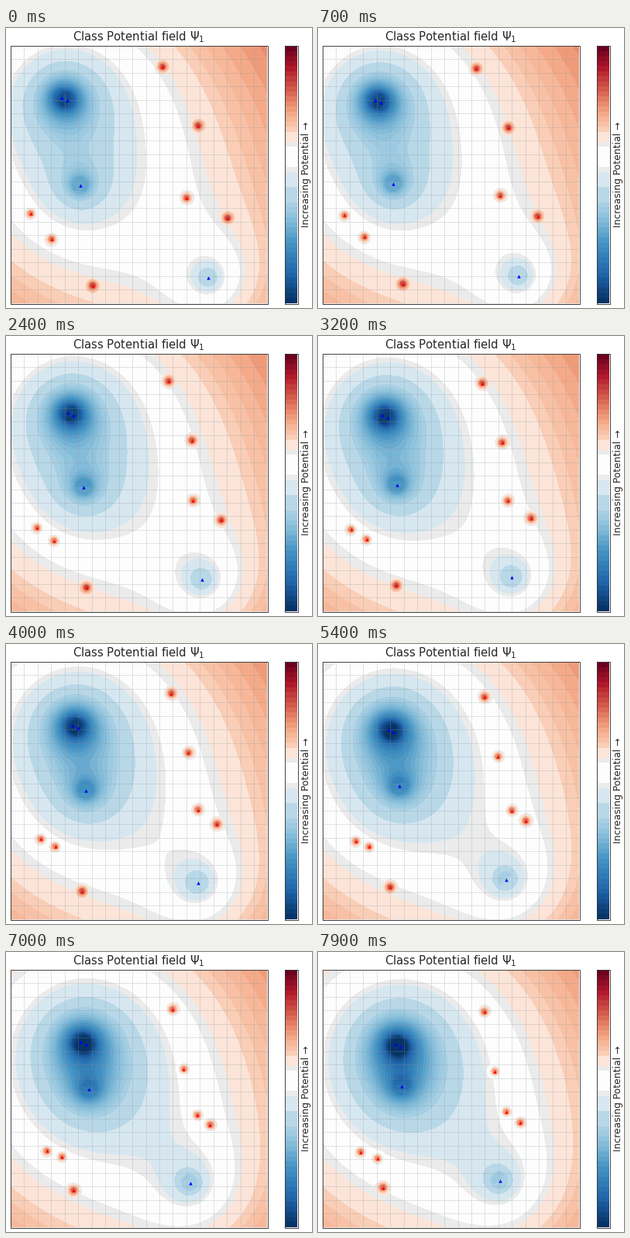
These frames come from a looping animation (395 px wide and 361 px high, 8 s). A matplotlib script:

```python
import numpy as np
import matplotlib
import matplotlib.pyplot as plt
from matplotlib.animation import FuncAnimation
from matplotlib.colors import ListedColormap, to_rgba
from matplotlib.patches import Rectangle

W, H, DPI = 395, 361, 100
X0, X1, Y0, Y1 = 6, 337, 23, 355
BAR = (360, 376)
FRAMES, STEP = 80, 100
PX = 72 / DPI                        # points per pixel
DEEP, MID, HIGH = 2.03, 1.475, 1.08  # attraction at both ends and at neutral
NEUTRAL, BANDS = 0.572, 51
ALPHA, CORE, HALO = 0.2, 10.0, 11.0

# Samples as x + yj: start, end, then optional bow and sway off the line
ATTRACT = [
    (72 + 90j, 99.5 + 119j),
    (79 + 93j, 106 + 122j),
    (95.5 + 203j, 107.5 + 173j, 1.4 + 0.8j),
    (261 + 322j, 234.5 + 295j),
]
REPEL = [
    (202 + 50j, 214.5 + 77j, 5),
    (248 + 126j, 228 + 154j, -2.5),
    (233 + 219j, 243 + 206j, 9.5 + 1j, -2.5 - 4j),
    (286 + 245j, 261 + 220j, -1),
    (32 + 239j, 55 + 257.5j, 1.5 + 3j),
    (59 + 272j, 77 + 266j, -4.5 - 8j, 1.5),
    (112 + 332j, 84 + 303.5j, 0.5 + 1j),
]


def drift(start, end, bow=0, sway=0, u=0):
    return (start + (end - start) * u
            + bow * np.sin(np.pi * u) + sway * np.sin(2 * np.pi * u))


def locate(tracks, u):
    return np.array([drift(*track, u=u) for track in tracks])


def band_colors():
    t = (np.arange(BANDS) + 0.5) / BANDS
    pos = np.interp(t, [0, NEUTRAL, 1], [0, 0.5, 1])
    colors = matplotlib.colormaps["RdBu_r"](pos)
    # Pale bands merge into flat tones around neutral
    first = 20
    for count, tone in [(3, "#b8d8e8"), (3, "#d7e7f0"), (1, "#ebebeb"),
                        (4, "#fdfdfd"), (1, "#ebebeb"), (2, "#fce4d8")]:
        colors[first:first + count] = to_rgba(tone)
        first += count
    return ListedColormap(colors)


GX, GY = np.meshgrid(np.arange(X0, X1) + 0.5, np.arange(Y0, Y1) + 0.5)
PLANE = GX + 1j * GY


def field(pull, push):
    v = np.zeros_like(GX)
    for p in pull:
        v += np.maximum(abs(PLANE - p), CORE) ** -ALPHA
    for p in push:
        r = np.clip(abs(PLANE - p), 3, HALO)
        v -= 1.1 * (r ** -ALPHA - HALO ** -ALPHA)
    return np.interp(v, [HIGH, MID, DEEP], [1, NEUTRAL, 0])


plt.rcParams["font.family"] = "DejaVu Sans"
fig = plt.figure(figsize=(W / DPI, H / DPI), dpi=DPI, facecolor="white")
ax = fig.add_axes([0, 0, 1, 1])
ax.axis("off")

style = dict(cmap=band_colors(), vmin=0, vmax=1,
             interpolation="nearest", aspect="auto")
heat = ax.imshow(np.zeros_like(GX), extent=(X0, X1, Y1, Y0), **style)
scale = np.linspace(1, 0, Y1 - Y0)[:, None]
ax.imshow(scale, extent=(*BAR, Y1, Y0), **style)
ax.set_xlim(0, W)
ax.set_ylim(H, 0)

cell = 17.45
grid = dict(color="#8c9498", alpha=0.28, lw=0.9 * PX)
ax.vlines(X0 + cell * np.arange(1, 19), Y0, Y1, **grid)
ax.hlines(Y0 + cell * np.arange(1, 20), X0, X1, **grid)

for left, right in [(X0, X1), BAR]:
    ax.add_patch(Rectangle((left - 0.5, Y0 - 0.5), right - left + 1,
                           Y1 - Y0 + 1, fill=False, ec="#333333",
                           lw=0.9 * PX, zorder=4))

mark = dict(ls="", marker="^", mew=0, ms=4.4 * PX, zorder=5)
blue, = ax.plot([], [], color="#0000ff", **mark)
red, = ax.plot([], [], color="#ff0000", **mark)

ink = dict(color="#262626", ha="center")
ax.text(171.5, 16, "Class Potential field $\\Psi_1$", va="baseline",
        fontsize=14.85 * PX, **ink)
ax.text(387, 189, "Increasing Potential →", va="center", rotation=90,
        fontsize=12.4 * PX, **ink)


def update(i):
    u = i / (FRAMES - 1)
    pull, push = locate(ATTRACT, u), locate(REPEL, u)
    heat.set_data(field(pull, push))
    blue.set_data(pull.real, pull.imag)
    red.set_data(push.real, push.imag)
    return heat, blue, red


anim = FuncAnimation(fig, update, frames=FRAMES, interval=STEP,
                     repeat=True, repeat_delay=0, blit=False)
plt.show()
```
